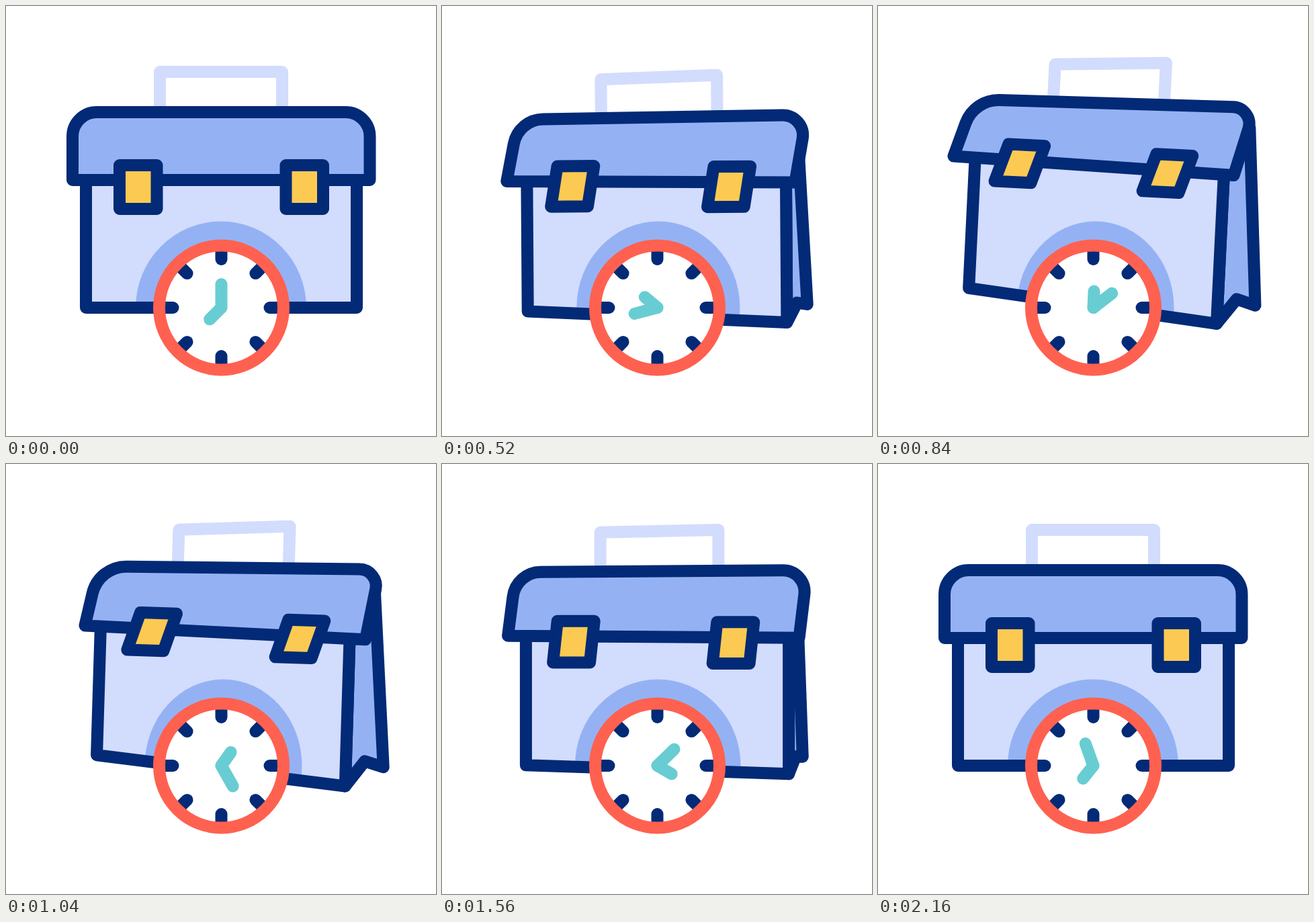
Write an HTML page with a canvas that moves like this. It is 640 by 640 pixels and loops after 2.2 s.

```html
<!DOCTYPE html>
<html lang="en">
<head>
<meta charset="utf-8">
<title>Briefcase and clock</title>
<style>
html, body { margin: 0; width: 100%; height: 100%; overflow: hidden; background: #fff; }
canvas { display: block; width: 640px; height: 640px; }
</style>
</head>
<body>
<canvas id="stage" width="640" height="640"></canvas>
<script>
const ctx = document.getElementById('stage').getContext('2d');
const LOOP = 2200, STEP = 40;
const NAVY = '#032a76', MID = '#94b2f3', PALE = '#d2dcfd',
      GOLD = '#fcca52', RED = '#ff6150', TEAL = '#68cdd2';

// Key poses as [time, value], eased between
const TURN = [[340, 0], [680, 1], [1360, 1], [1700, 0]];
const TILT = [[0, 0], [333, 2.9], [680, -3], [860, 3], [1265, 0]];
const LIFT = [[0, 0], [333, 4], [680, 3.5], [860, -22], [1265, 4], [1360, 4], [1560, -1], [1700, 0]];
const SWING = [[680, 0], [1040, 1], [1360, 0]];

const mix = (a, b, k) => a + (b - a) * k;

function track(keys, t) {
  const i = keys.findIndex(k => k[0] > t);
  if (i < 0) return keys[keys.length - 1][1];
  if (i === 0) return keys[0][1];
  const [t0, v0] = keys[i - 1], [t1, v1] = keys[i];
  const u = (t - t0) / (t1 - t0);
  return mix(v0, v1, u * u * (3 - 2 * u));
}

// Corners, clockwise from bottom left, of a panel centred on x, y with half
// sizes w, h; slant leans it, slope lowers its right side, flare makes that taller
function panel(x, y, w, h, slant = 0, slope = 0, flare = 0) {
  const corner = (sx, sy) => [x + sx * w - sy * slant, y + sx * slope + sy * (h + sx * flare)];
  return [corner(-1, 1), corner(-1, -1), corner(1, -1), corner(1, 1)];
}

function polygon(pts, closed = true) {
  const path = new Path2D();
  pts.forEach(p => path.lineTo(...p));
  if (closed) path.closePath();
  return path;
}

function roundTop([a, b, c, d], left, right) {
  const path = new Path2D();
  path.moveTo(...a);
  path.arcTo(...b, ...c, left);
  path.arcTo(...c, ...d, right);
  path.lineTo(...d);
  path.closePath();
  return path;
}

function paint(path, fill, stroke = NAVY) {
  if (fill) {
    ctx.fillStyle = fill;
    ctx.fill(path);
  }
  ctx.strokeStyle = stroke;
  ctx.stroke(path);
}

function drawBag(t) {
  const turn = track(TURN, t), swing = track(SWING, t);
  const m = (front, turned) => mix(front, turned, turn);

  const handle = panel(m(320, 329.5), m(128, 136), m(91, 82.5), 30, 0, m(0, -5));
  const front = panel(320.5, m(354, 361.5), m(201.5, 185.5), m(95, 106), 0, m(0, 10), m(0, 7.5));
  const lid = panel(m(320.25, 322) + 7.5 * swing, m(208.5, 211) + 2.5 * swing,
    m(221.25, 209), m(50.5, 46) + 2.5 * swing, m(0, 16.5) - 7.5 * swing, 0, m(0, 4));
  const buckles = [-1, 1].map(s => panel(
    m(320.5 + s * 123.75, 304.75 + s * 110.25) + 17 * swing, m(269.5, 261 + s * 2) + 5 * swing,
    m(27.75, 27), m(32.5, 28), m(0, 9)));

  // The side unfolds from the right edge of the front
  const [, , top, foot] = front;
  const side = [top, foot,
    [foot[0] + 28 * turn, foot[1] - m(19, 38)],
    [foot[0] + 56 * turn, foot[1] - m(23, 30)],
    [top[0] + 35 * turn, top[1] - m(19, 67)]];

  ctx.save();
  ctx.translate(320, 449 + track(LIFT, t));
  ctx.rotate(track(TILT, t) * Math.PI / 180);
  ctx.translate(-320, -449);

  paint(polygon(handle, false), null, PALE);
  if (turn > 0) paint(polygon(side), MID);
  const body = polygon(front);
  ctx.fillStyle = PALE;
  ctx.fill(body);

  // The clock's halo stays still but shows only on the front
  ctx.save();
  ctx.clip(body);
  ctx.resetTransform();
  ctx.beginPath();
  ctx.ellipse(m(320, 323.5), 449, m(127, 117), 128.5, 0, 0, 7);
  ctx.fillStyle = MID;
  ctx.fill();
  ctx.restore();

  paint(body);
  paint(roundTop(lid, m(36, 52), m(36, 25)), MID);
  buckles.forEach(b => paint(polygon(b), GOLD));
  ctx.restore();
}

function ray(angle, from, to, color) {
  const s = Math.sin(angle), c = -Math.cos(angle);
  ctx.beginPath();
  ctx.moveTo(s * from, c * from);
  ctx.lineTo(s * to, c * to);
  ctx.strokeStyle = color;
  ctx.stroke();
}

function drawClock(t) {
  const spin = t / LOOP * 2 * Math.PI;
  const ring = new Path2D();
  ring.arc(0, 0, 92.5, 0, 7);
  ctx.save();
  ctx.translate(320.5, 449);
  ctx.fillStyle = '#fff';
  ctx.fill(ring);
  for (let i = 0; i < 8; i++) ray(i * Math.PI / 4, 88, 72, NAVY);
  paint(ring, null, RED);
  ray(spin * 3, 0, 35, TEAL);
  ray(spin + Math.PI * 1.25, 0, 24.5, TEAL);
  ctx.restore();
}

function frame() {
  const t = Math.floor(performance.now() % LOOP / STEP) * STEP;
  ctx.fillStyle = '#fff';
  ctx.fillRect(0, 0, 640, 640);
  ctx.lineWidth = 18;
  ctx.lineJoin = ctx.lineCap = 'round';
  drawBag(t);
  drawClock(t);
  requestAnimationFrame(frame);
}
frame();
</script>
</body>
</html>
```
